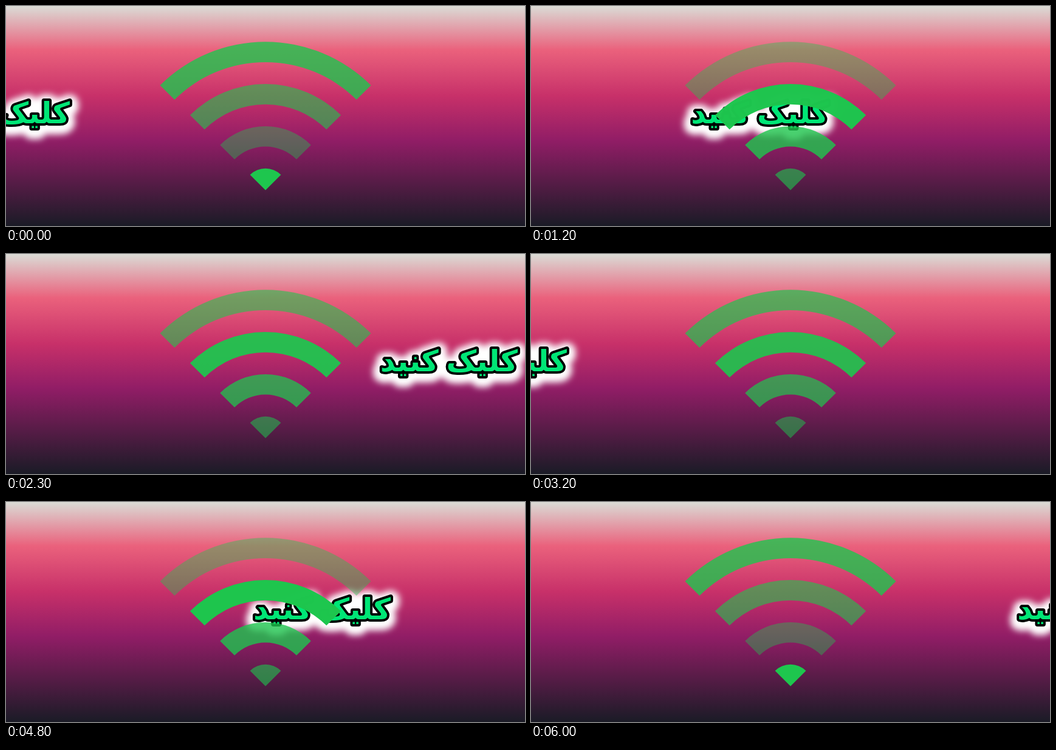
An HTML page that plays this animation: 854x364 px, repeating every 6100 ms.

```html
<!DOCTYPE html>
<html lang="fa">
<head>
<meta charset="utf-8">
<style>
  html, body { margin: 0; width: 100%; height: 100%; overflow: hidden; background: #1a1b26; }
  svg { display: block; width: 100vw; height: 100vh; }
  text { font: bold 48.5px "DejaVu Sans", sans-serif; word-spacing: -4px; direction: rtl; stroke-linejoin: round; }
  .glow { fill: #fff; stroke: #fff; stroke-width: 29px; }
  .face { fill: #00e676; stroke: #000; stroke-width: 8px; paint-order: stroke; }
</style>
</head>
<body>
<svg viewBox="0 0 854 364" preserveAspectRatio="none">
  <defs>
    <linearGradient id="sky" x1="0" y1="0" x2="0" y2="1">
      <stop offset="0" stop-color="#dadcd6"/>
      <stop offset=".2" stop-color="#ea617c"/>
      <stop offset=".41" stop-color="#c73069"/>
      <stop offset=".61" stop-color="#911d66"/>
      <stop offset="1" stop-color="#1a1b26"/>
    </linearGradient>
    <filter id="soft" x="-20%" y="-60%" width="140%" height="220%">
      <feGaussianBlur stdDeviation="5.5"/>
    </filter>
  </defs>
  <rect width="854" height="364" fill="url(#sky)"/>
  <g id="label">
    <text class="glow" y="198" filter="url(#soft)">کلیک کنید</text>
    <text class="face" y="194">کلیک کنید</text>
  </g>
  <g id="wifi" fill="#1ec64e"></g>
</svg>
<script>
  const LOOP = 6100, STEP = 100, LAP = 1110;
  const label = document.getElementById('label');
  const wifi = document.getElementById('wifi');

  // Quarter rings around one centre, from the dot outwards
  const bands = [0, 1, 2, 3].map(i => {
    const el = document.createElementNS('http://www.w3.org/2000/svg', 'path');
    const R = 36 + 69.8 * i, r = i ? R - 33.7 : 0;
    const a = r * Math.SQRT1_2, b = R * Math.SQRT1_2;
    el.setAttribute('d', `M${-b} ${-b}A${R} ${R} 0 0 1 ${b} ${-b}` +
      `L${a} ${-a}A${r} ${r} 0 0 0 ${-a} ${-a}Z`);
    el.setAttribute('transform', 'translate(427 304.7)');
    return wifi.appendChild(el);
  });

  // Distance travelled by the right edge of the text; it wraps after each lap
  const travel = [[0, 107], [2300, 844], [3200, LAP + 61], [4850, LAP + 653], [LOOP, LAP + 1061]];

  function along(keys, t) {
    const i = keys.findIndex(k => k[0] > t);
    const [t0, v0] = keys[i - 1], [t1, v1] = keys[i];
    return v0 + (v1 - v0) * (t - t0) / (t1 - t0);
  }

  // Turns of the signal pulse, a little faster mid-loop
  function pulse(t) {
    const u = t / (LOOP - STEP);
    return 33 * u - .11 * Math.sin(2 * Math.PI * u);
  }

  // Slow fade for three quarters of a turn, then a quick rise
  function shine(age) {
    return age < .75 ? 1 - .8 * age : .4 + 2.4 * (age - .75);
  }

  function draw(now) {
    const t = Math.floor(now % LOOP / STEP) * STEP;
    const right = (along(travel, t) + 20) % LAP - 20;
    label.setAttribute('transform', `translate(${right - 2} 0)`);
    const turn = pulse(t) + 1;
    bands.forEach((el, i) => el.setAttribute('opacity', shine((turn - i / 4) % 1)));
  }

  const start = performance.now();
  function tick() {
    draw(performance.now() - start);
    requestAnimationFrame(tick);
  }
  tick();
</script>
</body>
</html>
```
